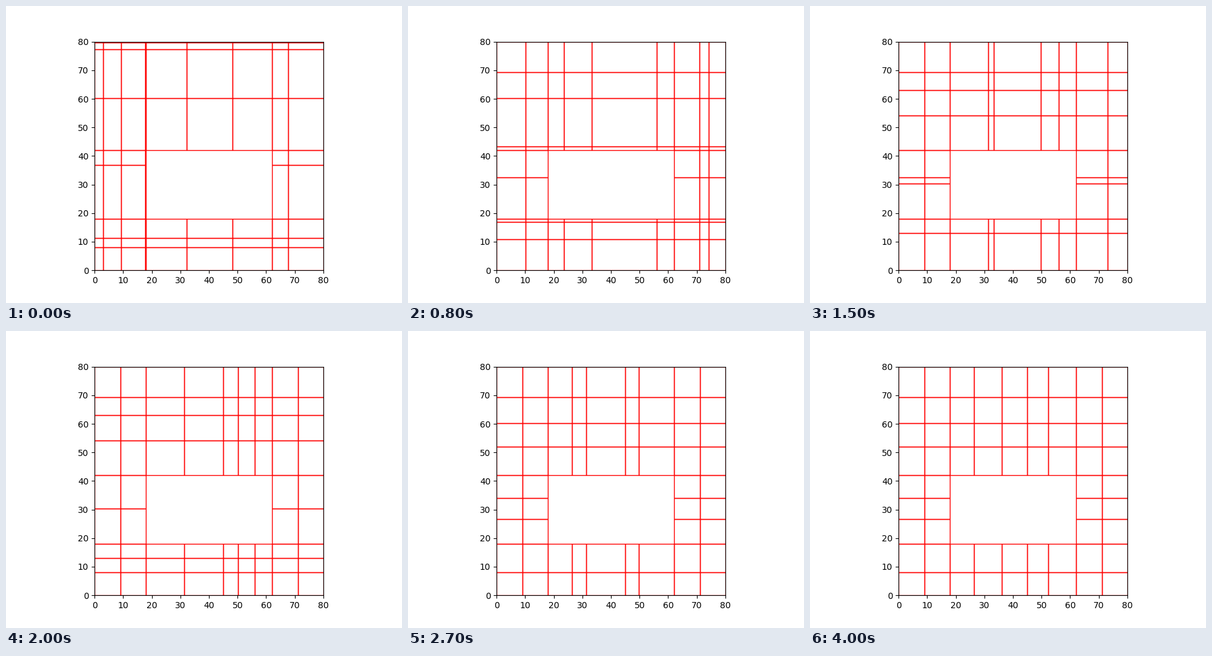
Animation, 640 px wide and 480 px high, one loop 4.1 s. Source, as a matplotlib script:

```python
import random

import matplotlib.pyplot as plt
from matplotlib.animation import FuncAnimation
from matplotlib.patches import Rectangle

SIZE = 80
HOLE_X = (18, 62)
HOLE_Y = (18, 42)
FRAMES, INTERVAL = 41, 100

# Each free grid line hops through four stops; lines are listed in hop order.
STAGES = [0, 5, 11, 30]
LINES = [
    ("y", 79.7, 69.96, 69.31, 69.31),
    ("x", 3.0, 11.0, 10.13, 9.05),
    ("x", 17.7, 44.33, 33.3, 44.98),
    ("x", 67.7, 75.06, 74.2, 71.17),
    ("y", 36.84, 33.16, 32.51, 8.05),
    ("x", 48.2, 56.0, 56.0, 26.36),
    ("y", 60.22, 60.22, 63.03, 60.22),
    ("y", 77.32, 43.33, 54.16, 51.99),
    ("y", 11.3, 16.93, 30.35, 34.03),
    ("y", 8.05, 10.87, 13.03, 26.67),
    ("x", 9.26, 23.55, 31.34, 36.1),
    ("x", 32.2, 70.95, 49.74, 52.34),
]


def stage_progress(stage, frame):
    start, end = STAGES[stage], STAGES[stage + 1]
    return (frame - start) / (end - start)


def lines_at(frame):
    """Positions of the free lines, grouped by axis."""
    rng = random.Random(frame)
    # Late in the search one line per frame tries a small shift.
    trying = STAGES[2] < frame < FRAMES - 1
    trial = rng.randrange(len(LINES)) if trying else None
    found = {"x": [], "y": []}
    for i, (axis, *stops) in enumerate(LINES):
        turn = (i + 1) / len(LINES)
        hops = sum(stage_progress(s, frame) >= turn
                   for s in range(len(STAGES) - 1))
        shift = rng.uniform(-1, 1) if i == trial else 0
        found[axis].append(stops[hops] + shift)
    return found


def edges(free, hole):
    return sorted([0, *hole, SIZE, *free])


def in_hole(x, y):
    return HOLE_X[0] <= x < HOLE_X[1] and HOLE_Y[0] <= y < HOLE_Y[1]


fig, ax = plt.subplots(figsize=(6.4, 4.8), dpi=100)
ax.set_xlim(0, SIZE)
ax.set_ylim(0, SIZE)
ax.set_aspect("equal")


def update(frame):
    for patch in list(ax.patches):
        patch.remove()
    lines = lines_at(frame)
    xs = edges(lines["x"], HOLE_X)
    ys = edges(lines["y"], HOLE_Y)
    for x0, x1 in zip(xs, xs[1:]):
        for y0, y1 in zip(ys, ys[1:]):
            if not in_hole(x0, y0):
                ax.add_patch(Rectangle((x0, y0), x1 - x0, y1 - y0,
                                       fill=False, edgecolor="r", linewidth=1))
    return ax.patches


anim = FuncAnimation(fig, update, frames=FRAMES, interval=INTERVAL,
                     init_func=lambda: update(0), repeat=True, repeat_delay=0)
plt.show()
```
